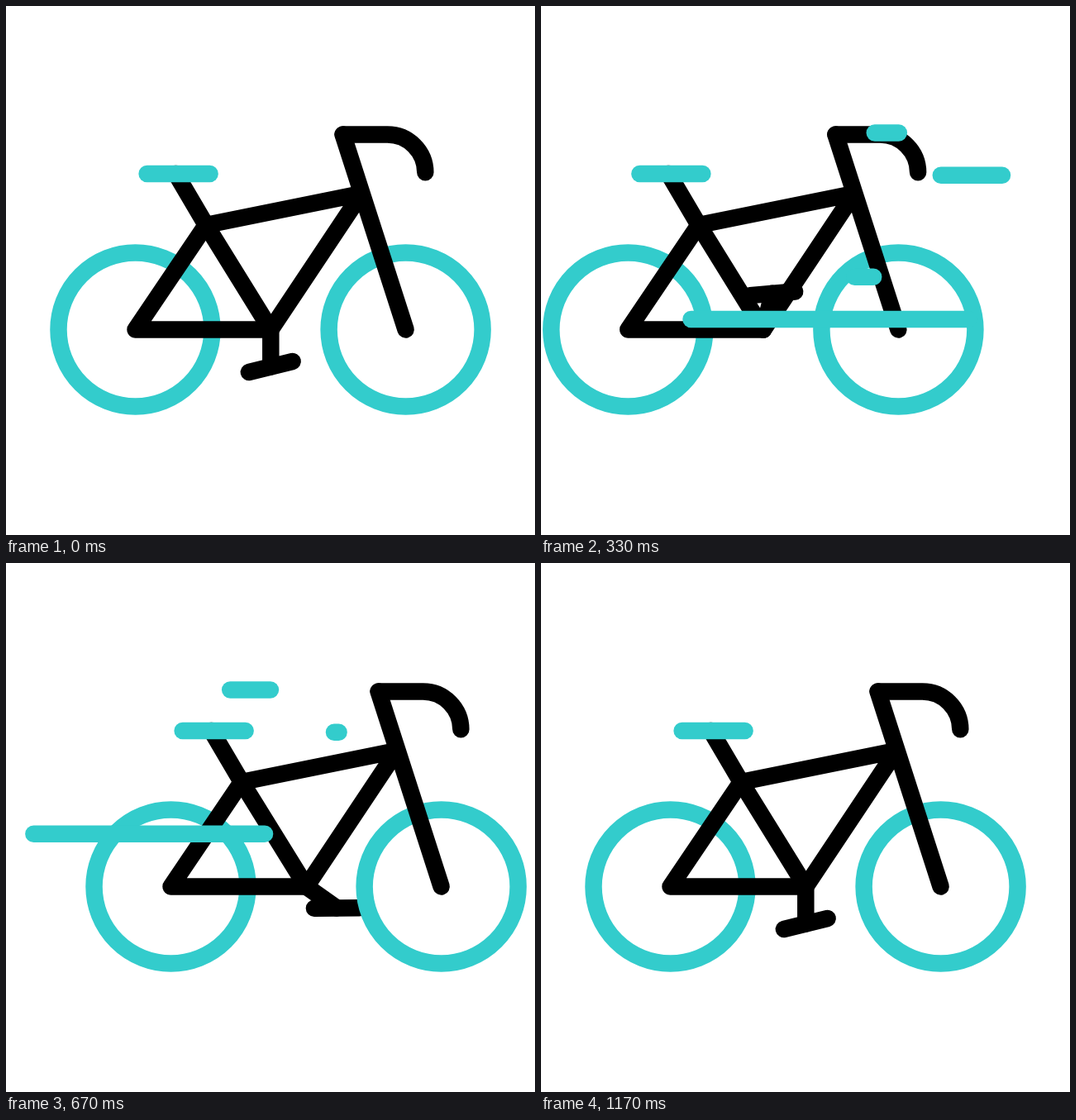
Recreate the animation shown at these times as an HTML page with a canvas. Size 640 by 640 pixels, loop 1.67 s.

```html
<!DOCTYPE html>
<html lang="en">
<head>
<meta charset="utf-8">
<title>Bicycle</title>
<style>
  html, body { margin: 0; width: 100%; height: 100%; overflow: hidden; background: #fff; }
  canvas { display: block; width: 100vmin; height: 100vmin; }
</style>
</head>
<body>
<canvas id="stage" width="640" height="640"></canvas>
<script>
const ctx = document.getElementById('stage').getContext('2d');
const LOOP = 1670, LAST_STEP = 35;
const BLACK = '#000', TEAL = '#33cccc';
const AXLE_Y = 391.5;

// step, horizontal offset of the bike
const RIDE = [[0, 0], [10, -51.2], [19, 43.7], [31, 0]];
// step, tilt of the pedal in degrees
const TILT = [[0, 0], [2.5, -33], [5, -44], [7.5, -28], [10, 9], [14, 5.8],
              [20, 13.3], [25, 18.3], [32, 14], [35, 0]];
// each streak grows leftwards from its right end, then shrinks towards its left end
const STREAKS = [
  { y: 379,   right: 527.3, left: 158.7, grow: [0, 12],   shrink: [9, 18] },
  { y: 204.8, right: 558,   left: 397,   grow: [5, 15.5], shrink: [13, 21] },
  { y: 153.5, right: 432.8, left: 271.2, grow: [7, 17.5], shrink: [15, 23] },
  { y: 327.8, right: 402.2, left: 33.4,  grow: [8, 20],   shrink: [17, 26] }
];

const mix = (a, b, u) => a + (b - a) * u;
const progress = (s, [from, to]) => Math.min(1, Math.max(0, (s - from) / (to - from)));
const linear = u => u;

// cubic-bezier(.39, 0, .61, 1)
function ease(u) {
  let lo = 0, hi = 1;
  for (let i = 0; i < 24; i++) {
    const m = (lo + hi) / 2, n = 1 - m;
    if (1.17 * m * n * n + 1.83 * m * m * n + m * m * m < u) lo = m; else hi = m;
  }
  return lo * lo * (3 - 2 * lo);
}

function track(keys, s, curve) {
  let i = 1;
  while (i < keys.length - 1 && s > keys[i][0]) i++;
  const [a, b] = [keys[i - 1], keys[i]];
  return mix(a[1], b[1], curve(progress(s, [a[0], b[0]])));
}

function stroke(color, build) {
  ctx.strokeStyle = color;
  ctx.beginPath();
  build();
  ctx.stroke();
}

function line(color, ...points) {
  stroke(color, () => points.forEach(([x, y]) => ctx.lineTo(x, y)));
}

function wheel(x) {
  stroke(TEAL, () => ctx.arc(x, AXLE_Y, 93, 0, Math.PI * 2));
}

function drawPedal(s) {
  const turn = ease(s / LAST_STEP) * Math.PI * 6;
  const tilt = (track(TILT, s, linear) - 13.8) * Math.PI / 180;
  const x = 320.3 - 45 * Math.sin(turn), y = AXLE_Y + 45 * Math.cos(turn);
  const dx = 27.2 * Math.cos(tilt), dy = 27.2 * Math.sin(tilt);
  line(BLACK, [320.3, AXLE_Y], [x, y]);
  line(BLACK, [x - dx, y - dy], [x + dx, y + dy]);
}

function drawBike(s) {
  const rear = [156.5, AXLE_Y], crank = [320.3, AXLE_Y];
  const seat = [242, 265], head = [430, 227], stem = [407.6, 155.5];
  ctx.save();
  ctx.translate(track(RIDE, s, ease), 0);
  drawPedal(s);
  wheel(156.5);
  wheel(483.6);
  line(BLACK, rear, seat, head, crank, rear);
  line(BLACK, [205.5, 203], seat, crank);
  line(BLACK, stem, [483.6, AXLE_Y]);
  stroke(BLACK, () => {
    ctx.moveTo(...stem);
    ctx.lineTo(461.5, 155.5);
    ctx.arc(461.5, 201.3, 45.8, -Math.PI / 2, 0);
  });
  line(TEAL, [170.6, 203], [246.6, 203]);
  ctx.restore();
}

function drawStreak(s, { y, right, left, grow, shrink }) {
  if (s <= grow[0] || s >= shrink[1]) return;
  line(TEAL,
    [mix(right, left, ease(progress(s, grow))), y],
    [mix(right, left, ease(progress(s, shrink))), y]);
}

function draw(now) {
  const tick = Math.floor((now % LOOP) / 10);
  const s = Math.min(LAST_STEP, Math.floor((3 * tick + 1) / 10));
  ctx.fillStyle = '#fff';
  ctx.fillRect(0, 0, 640, 640);
  ctx.lineWidth = 20.5;
  ctx.lineCap = ctx.lineJoin = 'round';
  drawBike(s);
  STREAKS.forEach(streak => drawStreak(s, streak));
}

const start = performance.now();
function loop() {
  draw(performance.now() - start);
  requestAnimationFrame(loop);
}
loop();
</script>
</body>
</html>
```
